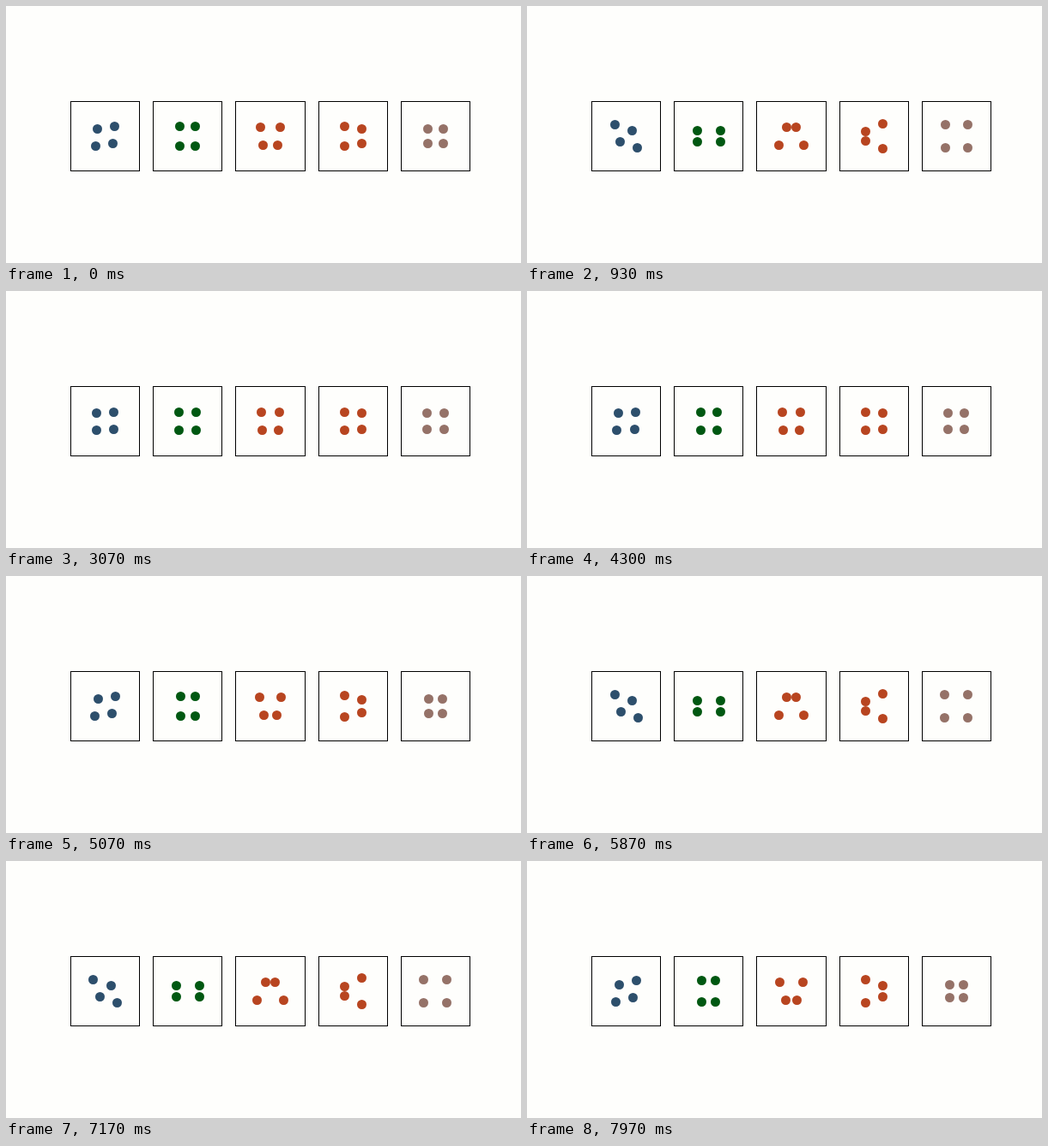
Animation of 600 by 300 pixels, one loop 8 s. Source, as an HTML page with a canvas:

```html
<!DOCTYPE html>
<html lang="en">
<head>
<meta charset="utf-8">
<title>Vibration modes</title>
<style>
  html, body { margin: 0; width: 100%; height: 100%; overflow: hidden; background: #fefefc; }
  canvas { display: block; }
</style>
</head>
<body>
<canvas id="stage" width="600" height="300"></canvas>
<script>
const ctx = document.getElementById('stage').getContext('2d');

const LOOP = 8000, FPS = 30;
const SIDE = 80.18, PITCH = SIDE * 1.2;
const LEFT = 75.47, TOP = 111.91;
const HALF = SIDE / 8;        // half the spacing between dots
const AMP = SIDE / 16;
const RADIUS = 5.5;
const OMEGA = 5, PHASE = 0.33;
const D = Math.SQRT1_2;

// Each mode gives the displacement of the dot at corner (u, v), both -1 or 1.
const modes = [
  { color: '#2d4f6c', move: (u, v) => [-v * D, -u * D] },
  { color: '#005812', move: (u, v) => [-u * D, v * D] },
  { color: '#b84520', move: (u, v) => [-u * v, 0] },
  { color: '#b84520', move: (u, v) => [0, -u * v] },
  { color: '#957268', move: (u, v) => [-u * D, -v * D] }
];

// Centre of the pixel that holds a coordinate.
const snap = a => Math.floor(a) + 0.5;

function drawBox(x, y) {
  const x0 = snap(x), y0 = snap(y);
  ctx.strokeStyle = '#000';
  ctx.lineWidth = 1;
  ctx.strokeRect(x0, y0, snap(x + SIDE) - x0, snap(y + SIDE) - y0);
}

function drawDot(x, y) {
  ctx.beginPath();
  ctx.arc(snap(x), snap(y), RADIUS, 0, Math.PI * 2);
  ctx.fill();
}

function drawMode({ color, move }, x, s) {
  drawBox(x, TOP);
  ctx.fillStyle = color;
  for (const u of [-1, 1]) {
    for (const v of [-1, 1]) {
      const [dx, dy] = move(u, v);
      drawDot(x + SIDE / 2 + u * HALF + dx * s, TOP + SIDE / 2 + v * HALF + dy * s);
    }
  }
}

function draw() {
  const ms = performance.now() % LOOP;
  // Motion advances in steps of 1/30 s; delays are rounded to 10 ms.
  const step = Math.min(Math.floor((ms + 5) * FPS / 1000), LOOP * FPS / 1000 - 1);
  const s = AMP * Math.sin(OMEGA * step / FPS + PHASE);
  ctx.fillStyle = '#fefefc';
  ctx.fillRect(0, 0, 600, 300);
  modes.forEach((mode, i) => drawMode(mode, LEFT + i * PITCH, s));
  requestAnimationFrame(draw);
}

draw();
</script>
</body>
</html>
```
